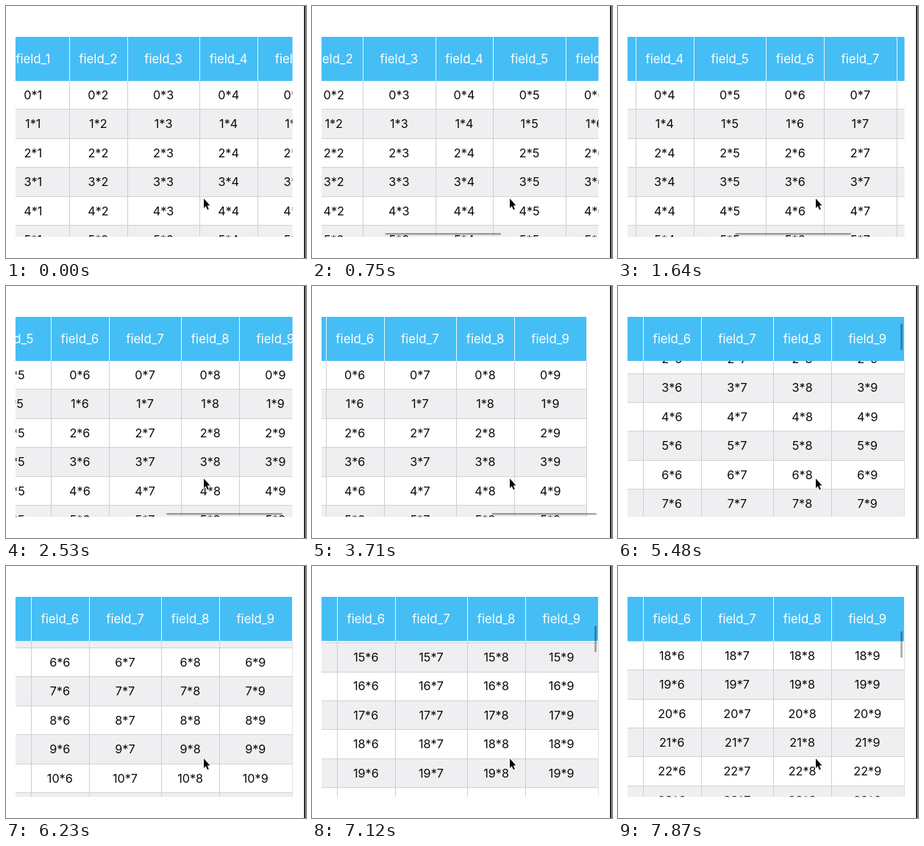
Write an HTML page with a canvas that moves like this. It is 408 px wide and 343 px high and loops after 8 s.

```html
<!DOCTYPE html>
<html lang="en">
<head>
<meta charset="utf-8">
<title>Scrolling table</title>
<style>
  html, body { margin: 0; width: 100%; height: 100%; overflow: hidden; background: #fff; }
  canvas { display: block; }
</style>
</head>
<body>
<canvas id="stage" width="408" height="343"></canvas>
<script>
const ctx = document.getElementById('stage').getContext('2d');

const LOOP = 8000, HALF = 4000, STEP = 148.3;
const view = { x: 12.7, y: 42, w: 376.9, h: 272.2 };
const headH = 60, bodyTop = 101, rowH = 39.4, narrow = 78.8, wide = 98.5;
const cols = 10, rows = 100;
const contentW = cols / 2 * (narrow + wide);
const contentH = headH + rows * rowH;
const maxX = 510.9;

const clamp = u => Math.min(1, Math.max(0, u));
const linear = u => u;
const easeOut = u => 1 - (1 - u) ** 2;
const smooth = u => u * u * (3 - 2 * u);
const move = (n, from, to, ease) => ease(clamp((n - from) / (to - from)));

// Drag right past the edge, then spring back
const scrollX = n => 104.3
  + 239.3 * move(n, 1, 11, linear)
  + 140.3 * move(n, 11, 17, linear)
  + 42.2 * move(n, 17, 25, easeOut)
  - 15.1 * move(n, 26, 30, easeOut);

// Two flicks downwards
const scrollY = n => 226.4 * move(n, 31, 41.8, smooth) + 482 * move(n, 43, 53, easeOut);

// Scroll bars appear at once and fade over the last three steps
const fade = (n, from, to) => clamp(Math.min(n - from, (to - n) / 3));

function rect(color, x, y, w, h) {
  ctx.fillStyle = color;
  ctx.fillRect(x, y, w, h);
}

// Pieces are drawn apart so that the asterisk keeps its raised form
function label(text, color, size, x, y) {
  ctx.font = size + 'px Inter, "Liberation Sans", sans-serif';
  ctx.fillStyle = color;
  const parts = text.split(/(\*)/);
  const widths = parts.map(p => ctx.measureText(p).width);
  x -= widths.reduce((a, b) => a + b) / 2;
  parts.forEach((p, i) => {
    ctx.fillText(p, x, y);
    x += widths[i];
  });
}

function clipped(x, y, w, h, draw) {
  ctx.save();
  ctx.beginPath();
  ctx.rect(x, y, w, h);
  ctx.clip();
  draw();
  ctx.restore();
}

function eachCol(offset, draw) {
  for (let c = 0; c < cols; c++) {
    const x = 13 + (c >> 1) * (narrow + wide) + (c % 2) * narrow - offset;
    const w = c % 2 ? wide : narrow;
    if (x < view.x + view.w && x + w > view.x - 1) draw(c, x, w);
  }
}

function drawBody(sx, sy) {
  const width = Math.round(13 + contentW - sx) + 1 - view.x;
  const first = Math.floor(sy / rowH);
  for (let r = first; r < first + 7; r++) {
    const y = bodyTop + r * rowH - sy;
    const line = Math.round(y + rowH);
    rect(r % 2 ? '#efeff1' : '#fff', view.x, Math.round(y) + 1, width, rowH);
    rect('#d2d2d4', view.x, line, width, 1);
    eachCol(sx, (c, x, w) => label(r + '*' + c, '#0a0a0a', 16.2, x + w / 2, y + 25.9));
  }
  eachCol(sx, (c, x, w) => rect('#cfcfd1', Math.round(x + w), view.y, 1, view.h));
}

function drawHead(sx) {
  rect('#45bef5', view.x, view.y, Math.round(13 + contentW - sx) - view.x, headH);
  eachCol(sx, (c, x, w) => {
    label('field_' + c, '#fff', 16.8, x + w / 2, view.y + 35.7);
    rect('#e4f5fd', Math.round(x + w), view.y, 1, headH);
  });
}

function thumb(x, y, w, h, alpha) {
  ctx.fillStyle = `rgba(0,0,0,${0.35 * alpha})`;
  ctx.beginPath();
  ctx.roundRect(x, y, w, h, 1.2);
  ctx.fill();
}

function drawBars(n, sx, sy) {
  const track = view.w - 6;
  const over = Math.max(0, sx - maxX);
  const len = track * view.w / contentW;
  const x = view.x + 3 + Math.min(sx, maxX) / contentW * track + over;
  thumb(x, 309, len - over, 2.4, fade(n, 1, 30));

  const size = 36;
  const y = view.y + 3 + sy / (contentH - view.h) * (view.h - 6 - size);
  thumb(384.3, y, 2.6, size, fade(n, 31, 42) + fade(n, 43, 60));
}

function drawPointer() {
  const points = [[269, 262], [269, 275], [271.8, 272.3], [273.9, 277.3], [275.8, 276.5],
                  [273.7, 271.6], [277.3, 271.4]];
  ctx.beginPath();
  points.forEach(p => ctx.lineTo(...p));
  ctx.closePath();
  ctx.strokeStyle = '#fff';
  ctx.lineWidth = 2;
  ctx.lineJoin = 'round';
  ctx.stroke();
  ctx.fillStyle = '#000';
  ctx.fill();
}

function draw(now) {
  const t = now % LOOP;
  const n = (t >= HALF ? 27 : 0) + Math.floor(t % HALF / STEP);
  const sx = scrollX(n), sy = scrollY(n);

  rect('#fff', 0, 0, 408, 343);
  clipped(view.x, view.y + headH, view.w, view.h - headH, () => drawBody(sx, sy));
  clipped(view.x, view.y, view.w, headH, () => drawHead(sx));
  drawBars(n, sx, sy);
  rect('#000', 405.4, 0, 1.6, 343);
  rect('#a8a8a8', 407, 0, 1, 343);
  drawPointer();
}

let start;
function loop(now) {
  start ??= now;
  draw(now - start);
  requestAnimationFrame(loop);
}
requestAnimationFrame(loop);
</script>
</body>
</html>
```
